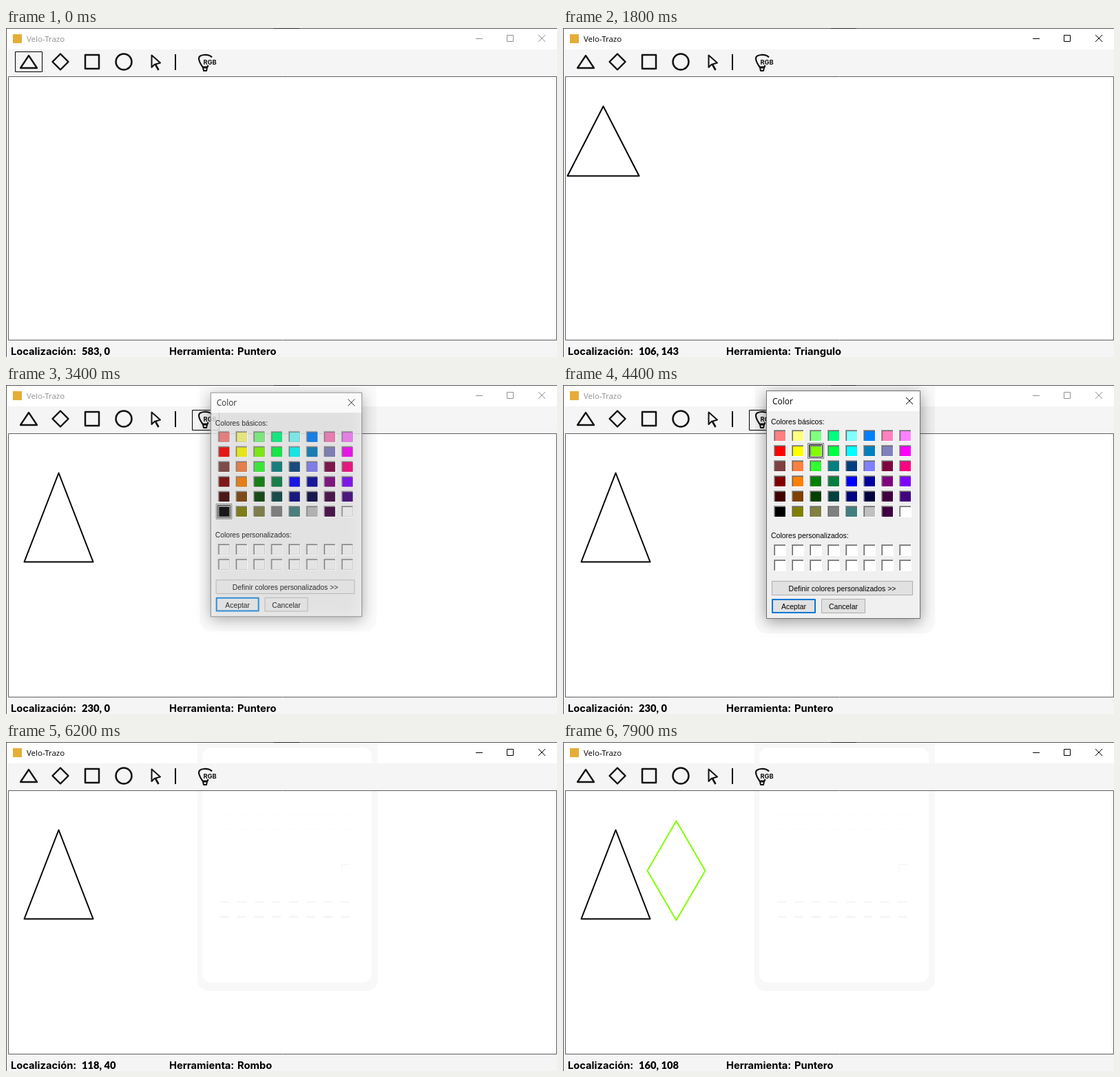
Animation, 800 px wide and 477 px high, one loop 8 s. Source, as an HTML page with a canvas:

```html
<!DOCTYPE html>
<html lang="es">
<head>
<meta charset="utf-8">
<title>Velo-Trazo</title>
<style>
html, body { margin: 0; width: 100%; height: 100%; overflow: hidden; background: #fff; }
canvas { display: block; }
</style>
</head>
<body>
<canvas id="stage" width="800" height="477"></canvas>
<script>
const ctx = document.getElementById('stage').getContext('2d');
const LOOP = 8000, STEP = 100;
const PANEL = { x: 4.5, y: 71.5 };
const LIME = '#80ff00';
const UI = '"Open Sans", "Noto Sans", sans-serif';
const DIALOG = '"Liberation Sans", Arial, sans-serif';

// Pointer path inside the drawing panel: time, x, y
const PATH = [
  [0, 583, 0], [100, 112, 88], [500, 38, 2], [900, 38, 2], [1000, 36, 4],
  [1300, 54, 42], [1800, 106, 143], [2100, 104, 171], [2200, 74, 130],
  [2300, 60, 125], [2600, 78, 139], [3000, 230, 0], [5000, 230, 0],
  [5100, 331, 249], [5400, 52, 39], [5600, 67, 1], [6000, 67, 1],
  [6100, 82, 4], [6300, 153, 75], [6700, 210, 150], [7100, 195, 147],
  [7200, 195, 147], [7400, 153, 140], [7900, 160, 108]
];

// One digit per channel: r, g, b
const BASIC = [
  'f88 ff8 8f8 0f8 8ff 08f f8c f8f',
  'f00 ff0 8f0 0f4 0ff 08c 88c f0f',
  '844 f84 3f3 088 048 88f 804 f08',
  '800 f80 080 084 00f 00a 808 80f',
  '400 840 040 044 008 004 404 408',
  '000 880 884 888 488 ccc 404 fff'
].map(row => row.split(' ').map(code =>
  '#' + [...code].map(d => d === 'f' ? 'ff' : d + '0').join('')));

const between = (t, a, b) => t >= a && t < b;

function pointer(t) {
  let i = 0;
  while (i < PATH.length - 2 && PATH[i + 1][0] <= t) i++;
  const [ta, xa, ya] = PATH[i], [tb, xb, yb] = PATH[i + 1];
  const k = Math.min(1, (t - ta) / (tb - ta));
  return { x: Math.round(xa + (xb - xa) * k), y: Math.round(ya + (yb - ya) * k) };
}

function box(x, y, w, h, color) {
  ctx.fillStyle = color;
  ctx.fillRect(x, y, w, h);
}

function frame(x, y, w, h, color, width = 1) {
  ctx.strokeStyle = color;
  ctx.lineWidth = width;
  ctx.strokeRect(x + width / 2, y + width / 2, w - width, h - width);
}

function text(str, x, y, font, color = '#000', align = 'left') {
  ctx.font = font;
  ctx.fillStyle = color;
  ctx.textAlign = align;
  ctx.fillText(str, x, y);
}

function poly(points, color, width, closed = true) {
  ctx.beginPath();
  points.forEach(([x, y]) => ctx.lineTo(x, y));
  if (closed) ctx.closePath();
  ctx.strokeStyle = color;
  ctx.lineWidth = width;
  ctx.lineJoin = 'round';
  ctx.stroke();
}

function cross(x, y, size, color) {
  poly([[x, y], [x + size, y + size]], color, 1, false);
  poly([[x + size, y], [x, y + size]], color, 1, false);
}

function rounded(x, y, w, h, r, color) {
  ctx.beginPath();
  ctx.roundRect(x, y, w, h, r);
  ctx.fillStyle = color;
  ctx.fill();
}

// Shapes hang from their top vertex; the pointer sets half width and height.
function triangle(x, y, dx, dy) {
  poly([[x, y], [x + dx, y + dy], [x - dx, y + dy]], '#000', 2);
}

function rhombus(x, y, dx, dy) {
  poly([[x, y], [x + dx, y + dy], [x, y + 2 * dy], [x - dx, y + dy]], LIME, 2);
}

function drawShapes(t) {
  const p = pointer(t);
  ctx.save();
  ctx.translate(PANEL.x, PANEL.y);
  if (between(t, 1300, 2200)) {
    triangle(54, 42, p.x - 54, p.y - 42);
  } else if (t >= 2200 && !between(t, 6300, 7300)) {
    const q = pointer(Math.min(2600, Math.max(2300, t)));
    triangle(54 + q.x - 60, 42 + q.y - 125, 50, 129);
  }
  if (between(t, 6300, 7300)) {
    rhombus(153, 75, p.x - 153, p.y - 75);
  } else if (t >= 7300) {
    const q = pointer(Math.max(7400, t));
    rhombus(q.x, 75 + q.y - 140, 42, 72);
  }
  ctx.restore();
}

function drawIcons() {
  poly([[33, 40], [45, 58], [21, 58]], '#111', 2.3);
  poly([[79, 37.5], [90.5, 49], [79, 60.5], [67.5, 49]], '#111', 2.4);
  poly([[115, 39], [135, 39], [135, 59], [115, 59]], '#111', 2.5);
  ctx.beginPath();
  ctx.arc(171, 49, 11.5, 0, 7);
  ctx.stroke();
  poly([[211.5, 39.5], [211.5, 57], [215.5, 53], [224, 50.5]], '#111', 2);
  poly([[217, 53], [221.5, 61]], '#111', 2.6, false);
  box(245, 38, 2, 23, '#000');

  ctx.strokeStyle = '#111';
  ctx.lineWidth = 2.2;
  ctx.beginPath();
  ctx.moveTo(299, 42.5);
  ctx.bezierCurveTo(294, 37, 279.5, 38, 280, 44.5);
  ctx.bezierCurveTo(280.3, 49, 283, 53, 285.5, 56.5);
  ctx.lineTo(292.5, 56.5);
  ctx.lineTo(293.5, 54);
  ctx.stroke();
  poly([[286, 57.5], [292, 57.5], [291, 62], [287, 62]], '#111', 2);
  text('RGB', 286.5, 53, 'bold 9.3px Inter, sans-serif', '#111');
}

function drawButtons(t) {
  if (between(t, 600, 1000)) box(13, 34, 40, 30, '#ddd');
  if (between(t, 5600, 6100)) box(59, 34, 40, 30, '#ddd');
  if (between(t, 3000, 3300)) box(270, 36, 40, 30, '#ddd');
  if (t < 800) frame(13, 34, 40, 30, '#000');
  if (between(t, 5900, 6000)) frame(59, 34, 40, 30, '#000');
  if (between(t, 3300, 5000)) frame(270, 36, 40, 30, '#000');
}

// Faint trace the dialog leaves behind
function drawTrace() {
  rounded(278, -20, 262, 381, 16, '#f8f8f8');
  rounded(285, 8, 246, 341, 14, '#fff');
  for (let c = 0; c < 8; c++) {
    const x = 311 + 25 * c;
    box(x, 105, 16, 1, '#fafafa');
    box(x, 126, 16, 1, '#fafafa');
    box(x, 231, 13, 2, '#f6f6f6');
    box(x, 252, 13, 3, '#f6f6f6');
  }
  box(487, 177, 12, 1, '#f3f3f3');
  box(487, 177, 1, 11, '#f3f3f3');
}

function drawWindow(t) {
  const active = between(t, 800, 3300) || t >= 5000;
  const ink = active ? '#000' : '#909090';
  const p = pointer(t);
  const tool = between(t, 900, 2200) ? 'Triangulo'
    : between(t, 6000, 7300) ? 'Rombo' : 'Puntero';

  box(0, 0, 800, 477, '#fff');
  if (t >= 5100) drawTrace();
  box(1, 31, 799, 39, '#f5f5f5');
  box(1, 453, 799, 24, '#f5f5f5');
  box(1, 70, 2, 383, '#f5f5f5');
  box(0, 0, 800, 1, '#555');
  box(389, 0, 37, 1, '#222');
  box(0, 0, 1, 477, '#555');
  frame(3, 70, 797, 383, '#606060');

  box(10, 9, 13, 13, '#e5ad38');
  text('Velo-Trazo', 30, 20, '11.5px ' + UI, ink);
  box(682, 15, 10, 1, ink);
  frame(727, 10, 10, 10, ink);
  cross(773, 10, 10, ink);

  drawButtons(t);
  drawIcons();
  drawShapes(t);

  const label = 'bold 14.7px Inter, sans-serif';
  text('Localización:', 7, 474, label);
  text(`${p.x}, ${p.y}`, 110, 474, '900 14.7px Lato, sans-serif');
  text('Herramienta:', 237, 474, label);
  text(tool, 336, 474, label);
}

function swatch(x, y, color) {
  box(x, y, 18, 17, '#fff');
  box(x, y, 17, 16, '#a0a0a0');
  box(x + 1, y + 1, 16, 15, '#696969');
  box(x + 2, y + 2, 15, 14, color);
}

function selection(x, y) {
  frame(x - 1, y - 1, 20, 19, '#000', 1);
  ctx.setLineDash([1, 1]);
  frame(x - 3, y - 3, 24, 23, '#000');
  ctx.setLineDash([]);
}

function button(str, x, y, w, fill, edge, width = 1) {
  box(x, y, w, 21, fill);
  frame(x, y, w, 21, edge, width);
  text(str, x + w / 2, y + 15, '10.5px ' + DIALOG, '#000', 'center');
}

function drawDialog(t) {
  if (!between(t, 3300, 5200)) return;
  const alpha = t === 3300 ? 0.3 : t === 3400 ? 0.8
    : t === 5000 ? 0.7 : t === 5100 ? 0.25 : 1;
  const scale = 0.92 + 0.08 * alpha;

  ctx.save();
  ctx.globalAlpha = alpha;
  ctx.translate(407, 174);
  ctx.scale(scale, scale);
  ctx.translate(-407, -174);

  rounded(279, -20, 261, 380, 16, 'rgba(0,0,0,.025)');
  ctx.shadowColor = 'rgba(0,0,0,.4)';
  ctx.shadowBlur = 20;
  ctx.shadowOffsetY = 4;
  box(295, 8, 224, 331, '#f0f0f0');
  ctx.shadowColor = 'transparent';
  box(295, 8, 224, 30, '#fff');
  frame(295, 8, 224, 331, '#6e6e6e');
  text('Color', 304, 28, '12px ' + UI);
  cross(498, 18, 10, '#000');

  const small = '10.5px ' + DIALOG;
  text('Colores básicos:', 302, 57, small);
  text('Colores personalizados:', 302, 222, small);
  BASIC.forEach((row, r) => row.forEach((color, c) =>
    swatch(306 + 26 * c, 65 + 22 * r, color)));
  for (let i = 0; i < 16; i++)
    swatch(306 + 26 * (i % 8), 231 + 22 * Math.floor(i / 8), '#fff');

  const [col, row] = t < 3800 ? [0, 5] : t < 4400 ? [1, 1] : [2, 1];
  selection(306 + 26 * col, 65 + 22 * row);

  const fill = t < 4700 ? '#e1e1e1' : t < 4800 ? '#e5f1fb' : '#cce4f7';
  button('Definir colores personalizados >>', 303, 284, 205, '#e1e1e1', '#adadad');
  button('Aceptar', 303, 310, 64, fill, '#0078d7', t < 4700 ? 2 : 1);
  button('Cancelar', 375, 310, 64, '#e1e1e1', '#adadad');
  ctx.restore();
}

const start = performance.now();

function tick() {
  const elapsed = (performance.now() - start) % LOOP;
  const t = Math.floor(elapsed / STEP) * STEP;
  drawWindow(t);
  drawDialog(t);
  requestAnimationFrame(tick);
}
tick();
</script>
</body>
</html>
```
